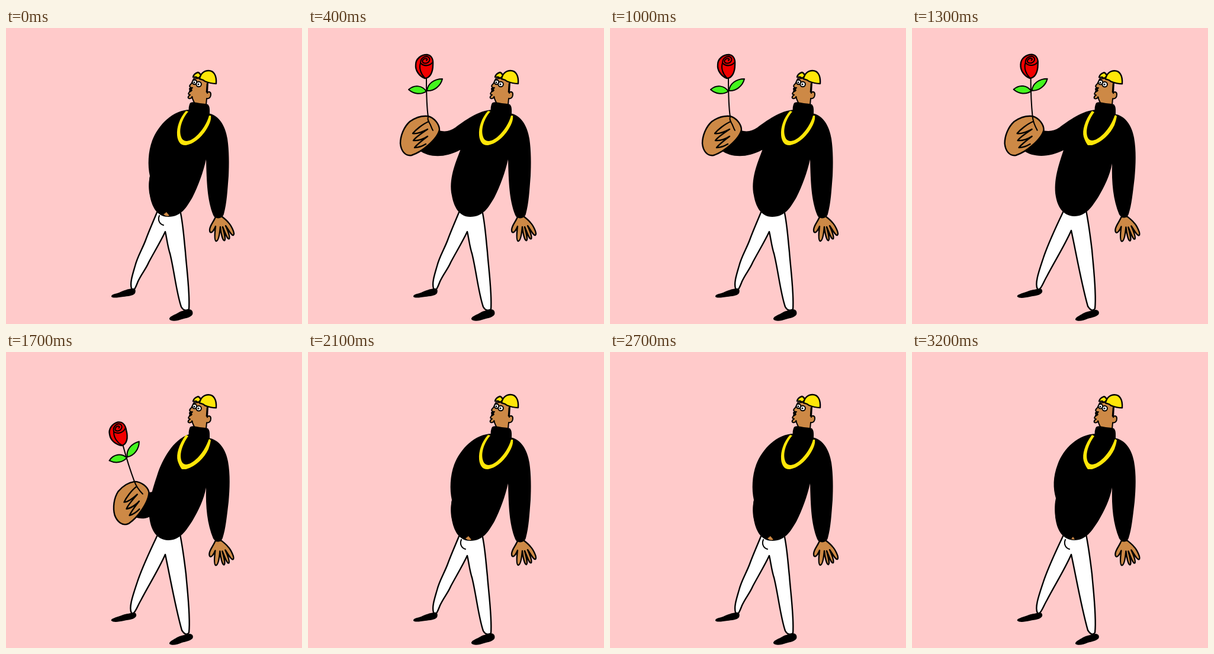
An HTML page for the animation above (3.3 s loop, 500 by 500 pixels).

```html
<!DOCTYPE html>
<html lang="en">
<head>
<meta charset="utf-8">
<title>Rose</title>
<style>
html, body { margin: 0; width: 100%; height: 100%; overflow: hidden; background: #ffcaca; }
svg { display: block; width: 100vw; height: 100vh; }
.line { fill: none; }
.ink { fill: #000; stroke: none; }
.skin { fill: #cd8946; }
.gold { fill: #ffe608; }
.red { fill: #f20000; }
.green { fill: #45f51e; }
.white { fill: #fff; }
</style>
</head>
<body>
<svg viewBox="0 0 500 500" stroke="#000" stroke-width="2.4" stroke-linejoin="round" stroke-linecap="round">
  <path id="pants" class="white"/>
  <path id="shoes" class="ink"/>
  <g id="restHand">
    <path class="skin" d="M354 319C351 327 344 334 344 341C344 348 349 347 354 335C353 343 351 359 355 360C359 360 361 347 362 336C363 346 366 360 369 359C372 357 368 345 366 336C370 345 374 358 377 356C379 353 375 343 371 334C376 341 381 351 384 350C388 347 379 332 376 329C372 324 368 321 364 318Z"/>
  </g>
  <path id="torso" class="ink"/>
  <path id="sleeve" class="ink"/>
  <g id="tucked">
    <path id="bulge" class="ink"/>
    <path id="patch" class="skin" stroke="none"/>
    <path class="line" stroke-width="2" d="M259 317C256 324 259 331 266 333"/>
  </g>
  <path id="chain" class="gold" stroke="none"/>

  <g id="head">
    <path class="skin" stroke-width="2" d="M317 86C315 90 314 94 311 96C309 99 311 101 315 101L310 103L313 106L309 109C307 112 309 112 311 113C306 116 307 120 311 119C314 118 316 117 314 116C315 120 317 124 319 128L338 130L339 119C344 120 346 116 346 112C346 108 342 106 340 110L341 92L328 84Z"/>
    <path class="ink" d="M310 101Q314 100 315 102Q313 103 315 105Q314 108 310 108Q308 107 310 105Q308 103 310 101Z"/>
    <path class="line" stroke-width="2.6" d="M340 94L339 108"/>
    <circle class="white" cx="318.5" cy="91.5" r="3.8" stroke-width="2"/>
    <circle class="white" cx="325.6" cy="95" r="4.3" stroke-width="2"/>
    <circle class="ink" cx="318" cy="92" r="1.4"/>
    <circle class="ink" cx="325" cy="95" r="1.5"/>
    <path class="gold" d="M327 86C328 77 335 72 342 72C351 72 356 80 355 94C347 94 341 92 336 90C333 87 330 87 327 86Z"/>
    <path class="gold" d="M316 83C317 78 321 76 324 75C327 75 328 78 329 80C327 84 324 86 322 83C320 82 318 84 316 83Z"/>
  </g>
  <path class="ink" d="M310 129C311 124 317 125 322 126C329 128 336 127 341 129C345 133 344 140 344 147L320 160L309 141C308 136 309 132 310 129Z"/>

  <g id="gift">
    <path class="skin" d="M203 149C214 152 222 163 222 172C220 182 212 190 203 198C195 205 184 212 175 215C164 217 157 207 156 195C156 182 162 167 172 158C182 151 194 148 203 149Z"/>
    <path class="line" d="M204 158C194 162 182 172 177 178C183 180 194 175 202 171C193 177 181 185 178 190C186 191 196 187 202 183C194 189 184 197 180 202C188 202 194 199 199 196"/>
    <g id="rose">
      <path id="stem" class="line" stroke-width="2"/>
      <path class="green" stroke-width="2" d="M200 107C193 97 180 95 170 104C179 112 191 113 200 107Z"/>
      <path class="green" stroke-width="2" d="M201 106C202 94 213 86 227 86C224 98 213 107 201 106Z"/>
      <path class="red" d="M197 85C188 81 181 72 182 62C182 52 191 45 201 45C208 46 212 52 211 62C211 75 206 85 197 85Z"/>
      <path class="line" stroke-width="2" d="M197 84C191 78 187 68 190 59C196 66 207 64 211 57M190 59C190 52 195 48 201 48C207 50 207 56 201 59C195 61 191 57 195 53C198 50 204 52 200 55"/>
    </g>
  </g>
</svg>
<script>
const STEP = 100, COUNT = 33;
const el = id => document.getElementById(id);

// Two hand-drawn versions of each wobbling outline
const outlines = {
  pants: [
    "M256 309C249 326 241 344 236 358C230 374 222 386 218 402C214 416 209 430 212 440C216 447 219 438 223 428C229 415 237 406 241 396C250 379 261 361 269 344C272 357 273 369 277 381C284 409 288 448 296 471Q301 480 309 475C311 448 305 406 303 378C300 350 299 329 294 308Z",
    "M256 309C244 335 230 363 221 391C214 412 207 432 212 441C217 445 222 429 228 419C242 392 257 369 269 342C278 384 286 431 297 470Q304 481 309 474C312 448 306 400 304 375C301 350 298 328 294 308Z"
  ],
  shoes: [
    "M213 440C218 439 220 443 218 448C214 453 205 453 198 454C190 455 181 457 178 454C177 450 185 449 191 447C200 443 205 441 213 440ZM306 476C313 473 317 479 315 484C312 489 304 490 297 492C289 495 279 496 276 492C275 488 283 485 289 482C295 478 301 477 306 476Z",
    "M211 441C218 438 221 442 220 446C217 452 208 452 199 454C190 456 181 457 178 454C176 450 188 448 195 445C202 442 207 442 211 441ZM306 477C313 474 318 479 315 484C311 488 304 489 297 491C289 495 279 496 276 493C275 489 283 486 289 482C295 479 301 478 306 477Z"
  ],
  torso: [
    "M309 139L346 145C363 151 371 169 374 187C377 207 377 231 376 250C374 275 373 296 368 314C366 323 353 324 350 316C340 290 339 262 338 222C333 244 325 266 315 286C305 303 296 319 274 319C254 319 246 300 243 283C237 256 249 228 257 207C264 182 282 148 309 139Z",
    "M309 139L346 146C363 151 372 168 375 185C379 207 378 231 376 253C373 278 371 299 366 314C363 323 354 322 350 315C340 291 337 262 338 229C334 250 325 268 315 285C304 302 294 318 274 318C254 317 246 301 243 285C238 257 249 228 256 206C264 182 282 148 309 139Z"
  ],
  bulge: [
    "M311 138C282 138 257 164 247 190C240 209 239 232 243 250C241 259 241 272 244 286C248 301 254 309 263 315L300 290L320 170Z",
    "M311 138C281 139 256 162 246 190C238 211 238 230 243 247C240 260 241 274 244 286C248 301 254 309 263 315L300 290L320 170Z"
  ],
  patch: ["M266 315L271 311L276 317Q271 319 266 315Z", "M269 316L272 312L275 317Z"],
  chain: [
    "M304 140C293 152 288 168 289 181C290 193 296 199 304 198C321 195 334 180 341 167C345 160 347 153 346 148L343 148C340 160 331 174 321 183C313 190 304 194 298 188C290 176 296 155 308 141Z",
    "M304 140C292 156 287 173 290 184Q293 193 297 198L304 198C321 193 335 179 342 164Q345 156 346 149L343 146C339 159 330 174 320 182C312 189 303 193 298 187C291 175 298 156 308 142Z"
  ],
  stem: [
    "M200 85C200 108 200 130 203 150C201 155 204 158 206 162C208 166 209 170 211 173",
    "M199 85C199 108 200 130 202 150C203 159 206 166 210 173"
  ]
};

// Hand offset and turn at each step; null means the hand is tucked away
const moves = {
  2: [22, 62, -14], 3: [3, -15, 3],
  16: [8, 22, -5], 17: [24, 68, -15]
};
function handPose(f) {
  if (moves[f]) return moves[f];
  return f >= 4 && f < 16 ? [0, 0, 0] : null;
}

function sleevePath([x, y, turn], wob) {
  const a = turn * Math.PI / 180;
  const at = (px, py) => {
    const u = px - 205, v = py - 190;
    return `${205 + x + u * Math.cos(a) - v * Math.sin(a)} ${190 + y + u * Math.sin(a) + v * Math.cos(a)}`;
  };
  return `M311 138C${288 + x / 4} ${139 + y / 4} ${264 + x / 2} ${157 + y / 2} ${249 + x * .7} ${168 + y * .7}` +
    `C${at(240, 174)} ${at(232, 176 - wob)} ${at(221, 173)}L${at(188, 207)}` +
    `C${at(205, 219)} ${at(231, 220 - wob)} ${257 + x / 3} ${206 + y / 3}L290 205L320 160Z`;
}

let shown = -1;
function draw(f) {
  const wob = (f < 18 ? f : f + 1) % 2;
  for (const id in outlines) el(id).setAttribute("d", outlines[id][wob]);
  el("restHand").setAttribute("transform", `translate(${-wob * .6} ${wob * .4})`);
  el("head").setAttribute("transform", `translate(0 ${wob * .3})`);
  el("rose").setAttribute("transform", `translate(${wob} ${-wob * .3})`);

  const pose = handPose(f);
  for (const id of ["gift", "sleeve"]) el(id).style.display = pose ? "" : "none";
  el("tucked").style.display = pose ? "none" : "";
  if (pose) {
    const [x, y, turn] = pose;
    el("sleeve").setAttribute("d", sleevePath(pose, wob));
    el("gift").setAttribute("transform", `translate(${x + wob * .6} ${y}) rotate(${turn} 205 190)`);
  }
}

const start = performance.now();
function tick() {
  const f = Math.floor(Math.max(0, performance.now() - start) / STEP) % COUNT;
  if (f !== shown) draw(shown = f);
  requestAnimationFrame(tick);
}
tick();
</script>
</body>
</html>
```
